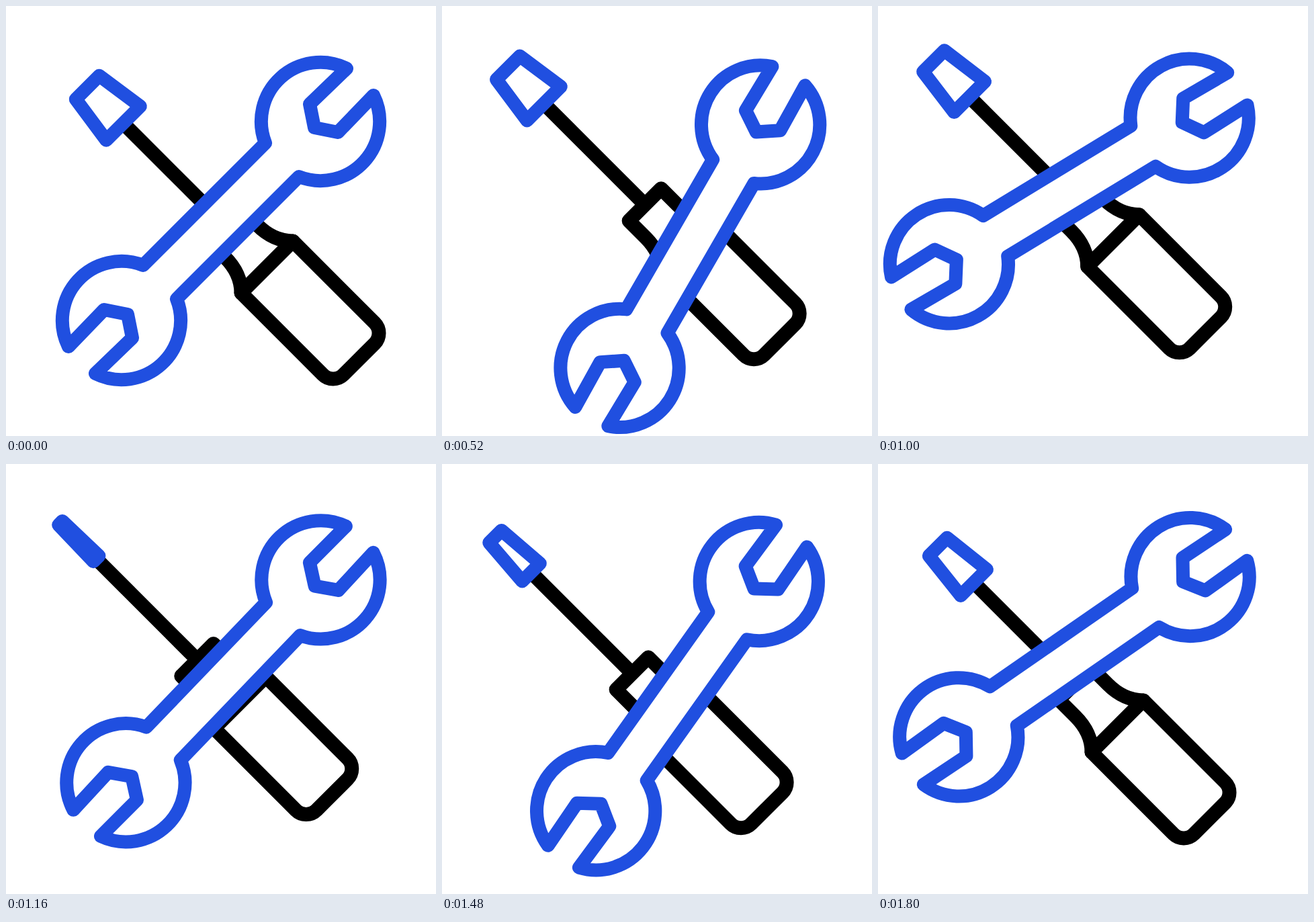
Recreate the animation shown at these times as an HTML page. Size 640 px wide and 640 px high, loop 1840 ms.

```html
<!DOCTYPE html>
<html lang="en">
<head>
<meta charset="utf-8">
<title>Wrench and screwdriver</title>
<style>
  html, body { margin: 0; width: 100%; height: 100%; overflow: hidden; background: #fff; }
  svg { display: block; width: 100vw; height: 100vh; }
  path { fill: #fff; stroke: #000; stroke-width: 21; stroke-linejoin: round; }
  .blue { stroke: #204fe0; stroke-width: 20; }
  #mark { fill: none; stroke-linecap: round; }
</style>
</head>
<body>
<svg viewBox="0 0 640 640">
  <g id="driver">
    <path d="M172 172L325 325"/>
    <path d="M350 427C350 407 341 389 326 374L301 349L349 301L374 326C389 341 407 350 427 350Z"/>
    <path d="M350 427L427 350L548.7 471.7A21.7 21.7 0 0 1 548.7 502.3L502.3 548.7A21.7 21.7 0 0 1 471.7 548.7Z"/>
    <path id="mark" class="blue" pathLength="100" d="M435 472Q465 461 479 434"/>
    <path id="blade" class="blue"/>
  </g>
  <path id="wrench" class="blue" d="M507 93L452 146L459 181L494 188L547 133A88 88 0 0 1 436 254L254 436
    A88 88 0 0 1 133 547L188 494L181 459L146 452L93 507A88 88 0 0 1 204 386L386 204A88 88 0 0 1 507 93Z"/>
</svg>
<script>
const LOOP = 1840, STEP = 40;
const LEAD = 535, BEAT = 410; // first swing, then every further one
const el = id => document.getElementById(id);
const clamp = x => Math.min(1, Math.max(0, x));

// Cosine ease between [position, value] keys
function eased(keys, x) {
  const i = keys.findIndex(k => k[0] > x);
  const [x0, a] = keys[i - 1], [x1, b] = keys[i];
  return a + (b - a) * (1 - Math.cos(Math.PI * (x - x0) / (x1 - x0))) / 2;
}

const swing = [45, 60, 30, 60, 34.5, 45].map((angle, i) => [i, angle]);
const driftX = [[0, 0], [920, -38], [1400, -42.5], [2000, -28.5]];
const driftY = [[0, 0], [800, -40.3], [900, -40.3], [1900, 3]];

function bladePath(beat) {
  // Half a turn per beat; the last one opens only partly
  const turn = 1.1 * Math.abs(Math.cos(Math.PI * beat)) - .1;
  const open = Math.max(.165, turn * (1 - .2 * clamp(beat - 3) ** 2));
  const tip = 17.5 * open, base = 25.3 * open;
  const at = (u, v) => `${u + v} ${u - v}`;
  return `M${at(121.3, -tip)}L${at(121.3, tip)}L${at(174.5, base)}L${at(174.5, -base)}Z`;
}

function draw(now) {
  const t = Math.floor(now % LOOP / STEP) * STEP;
  const beat = t < LEAD ? (t / LEAD) ** 1.06 : 1 + (t - LEAD) / BEAT;

  el('wrench').setAttribute('transform', `rotate(${45 - eased(swing, beat)} 488 151)`);
  el('driver').setAttribute('transform', `translate(${eased(driftX, t)} ${eased(driftY, t)})`);
  el('blade').setAttribute('d', bladePath(beat));

  // The mark is drawn in across the handle, then wiped out
  const from = 100 * clamp((t - 340) / 120), to = 100 * clamp((t - 180) / 120);
  const mark = el('mark').style;
  mark.display = to > from ? '' : 'none';
  mark.strokeDasharray = `${to - from} 300`;
  mark.strokeDashoffset = -from;
}

const start = performance.now();
function loop() {
  draw(performance.now() - start);
  requestAnimationFrame(loop);
}
loop();
</script>
</body>
</html>
```
